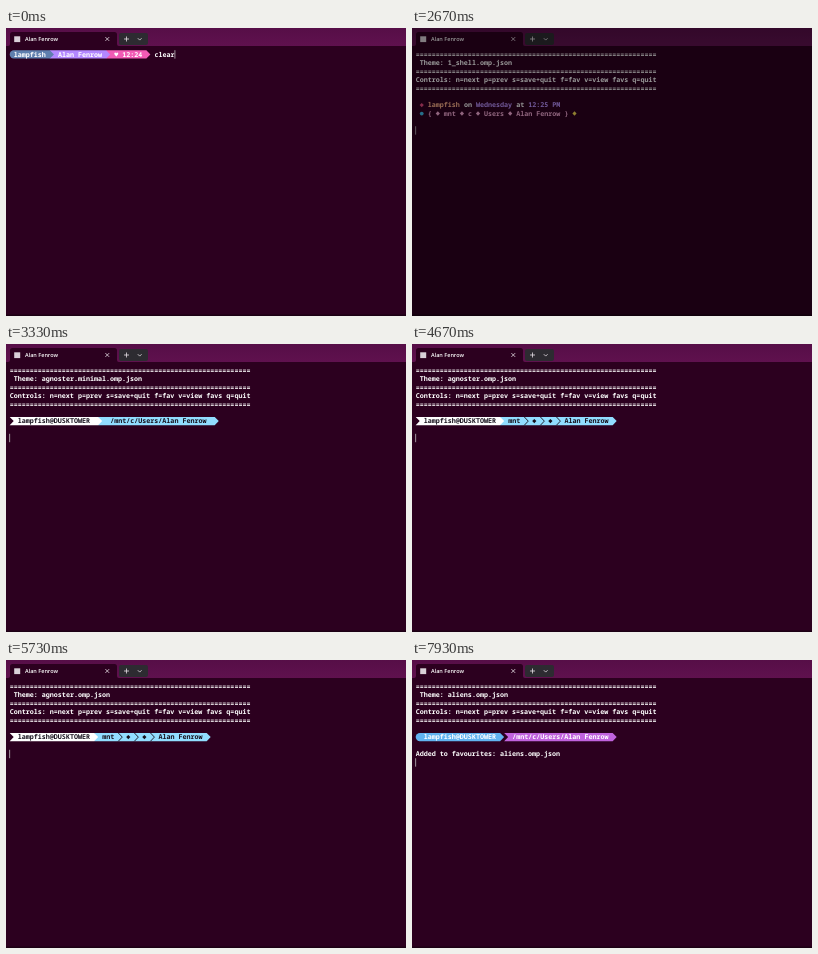
An HTML page that plays this animation: 400x288 px, repeating every 8 s.

```html
<!DOCTYPE html>
<html lang="en">
<head>
<meta charset="utf-8">
<title>Prompt theme browser</title>
<style>
html, body { margin: 0; width: 100%; height: 100%; overflow: hidden; background: #2c001f; }
svg { display: block; width: 100vw; height: 100vh; }
text { white-space: pre; text-rendering: geometricPrecision; }
.mono { font: 600 6.7px "Noto Sans Mono", "DejaVu Sans Mono", monospace; }
.tab { font: 600 5.5px "Open Sans", Inter, sans-serif; }

.scene { opacity: 0; animation: 8s step-end infinite; }
#cleared { animation-name: cleared; }
#typing { animation-name: typing; }
#head { animation-name: head; }
#shell { animation-name: shell; }
#minimal { animation-name: minimal; }
#agnoster { animation-name: agnoster; }
#aliens { animation-name: aliens; }
#waiting { animation-name: waiting; }
#added { animation-name: added; }
#cover { animation: type 8s infinite; }
#fade { opacity: 0; animation: fade 8s linear infinite; }

@keyframes cleared { 0% { opacity: 1 } .875%, 100% { opacity: 0 } }
@keyframes typing { 0% { opacity: 0 } .875% { opacity: 1 } 11.625%, 100% { opacity: 0 } }
@keyframes head { 0% { opacity: 0 } 11.625%, 100% { opacity: 1 } }
@keyframes shell { 0% { opacity: 0 } 12.5% { opacity: 1 } 36.625%, 100% { opacity: 0 } }
@keyframes minimal { 0% { opacity: 0 } 36.625% { opacity: 1 } 56.625%, 100% { opacity: 0 } }
@keyframes agnoster { 0% { opacity: 0 } 56.625% { opacity: 1 } 75%, 100% { opacity: 0 } }
@keyframes aliens { 0% { opacity: 0 } 75%, 100% { opacity: 1 } }
@keyframes waiting { 0% { opacity: 0 } 75% { opacity: 1 } 94.125%, 100% { opacity: 0 } }
@keyframes added { 0% { opacity: 0 } 94.125%, 100% { opacity: 1 } }
@keyframes type {
  0%, 1.375% { transform: none; animation-timing-function: steps(10) }
  7.5%, 100% { transform: translateX(40.2px) }
}
@keyframes fade {
  0%, 31.25% { opacity: 0 }
  36.5%, 37.375% { opacity: 1 }
  38.375%, 100% { opacity: 0 }
}
</style>
</head>
<body>
<svg viewBox="0 0 400 288" preserveAspectRatio="none">
  <defs>
    <linearGradient id="bar" x2="0" y2="1">
      <stop offset="0" stop-color="#560e47"/>
      <stop offset="1" stop-color="#5f114e"/>
    </linearGradient>
  </defs>
  <rect width="400" height="288" fill="#2c001f"/>
  <rect width="400" height="18" fill="url(#bar)"/>
  <path d="M2 18Q4 18 4 16V6.500Q4 4 6.500 4H108.500Q111 4 111 6.500V16Q111 18 113 18Z" fill="#2c001f"/>
  <rect x="8.200" y="8.300" width="6" height="5.800" fill="#d9d0d8"/>
  <text class="tab" x="19" y="13.300" fill="#fff">Alan Fenrow</text>
  <rect x="113" y="5" width="29" height="12" rx="2" fill="#2d2b31"/>
  <g fill="none" stroke="#e6dfe5" stroke-width=".8">
    <path d="M99.400 9.100l3.800 3.800m0-3.800l-3.800 3.800"/>
    <path d="M118 11h5m-2.500-2.500v5"/>
    <path d="M131.800 10.200l1.900 1.900 1.900-1.900"/>
  </g>
  <rect y="286.500" width="400" height="1.500" fill="#1c0014"/>

  <g class="scene" id="cleared"></g>
  <g class="scene" id="typing"></g>
  <g class="scene" id="head"></g>
  <g class="scene" id="shell"></g>
  <g class="scene" id="minimal"></g>
  <g class="scene" id="agnoster"></g>
  <g class="scene" id="aliens"></g>
  <g class="scene" id="waiting"></g>
  <g class="scene" id="added"></g>
  <rect id="fade" width="400" height="288"/>
</svg>
<script>
const USER = 'lampfish', HOST = 'DUSKTOWER', NAME = 'Alan Fenrow';
const HOME = '/mnt/c/Users/' + NAME;
const DARK = '#16101c', SKY = '#91ddff', PINK = '#f2a9d4';
const $ = id => document.getElementById(id);
const X = col => 3.7 + col * 4.02;
const Y = row => 26.4 + row * 8.45;

function add(parent, tag, attrs, text) {
  const el = document.createElementNS('http://www.w3.org/2000/svg', tag);
  for (const k in attrs) el.setAttribute(k, attrs[k]);
  if (text) el.textContent = text;
  parent.append(el);
  return el;
}
function put(g, row, col, text, fill = '#fff') {
  add(g, 'text', { class: 'mono', x: X(col), y: Y(row) + 2.3, fill }, text);
}
function diamond(g, row, col, fill) {
  add(g, 'path', { d: `M${X(col + .5)} ${Y(row) - 2.2}l2.1 2.2l-2.1 2.2l-2.100-2.200Z`, fill });
}
function cursor(g, row, col = 0) {
  return add(g, 'rect', { x: X(col) - .4, y: Y(row) - 4.2, width: .8, height: 8.4, fill: '#bdb8bc' });
}
// A powerline block with an arrow tip on its right
function block(g, row, from, to, fill, left = 'flat') {
  const h = 4.2, y = Y(row), a = X(from), b = X(to);
  const start = left === 'round' ? a + h : a;
  const close = {
    flat: '',
    notch: `L${X(from + 1)} ${y}`,
    round: `A${h} ${h} 0 0 1 ${start} ${y - h}`
  }[left];
  add(g, 'path', { d: `M${start} ${y - h}H${b}L${X(to + 1)} ${y}L${b} ${y + h}H${start}${close}Z`, fill });
}
function chevron(g, row, col) {
  add(g, 'path', {
    d: `M${X(col)} ${Y(row) - 4.2}L${X(col + 1)} ${Y(row)}L${X(col)} ${Y(row) + 4.2}`,
    fill: 'none', stroke: DARK, 'stroke-width': .9
  });
}
function theme(g, name) {
  put(g, 1, 1, `Theme: ${name}.omp.json`);
}

function heartPrompt(g, time) {
  block(g, 0, 24, 34, '#f15bb5');
  block(g, 0, 10, 24, '#b388ff');
  block(g, 0, 0, 10, '#5f7fae', 'round');
  put(g, 0, 1, USER);
  put(g, 0, 12, NAME);
  put(g, 0, 26, '♥');
  put(g, 0, 28, time);
}
heartPrompt($('cleared'), '12:24');
put($('cleared'), 0, 36, 'clear');
cursor($('cleared'), 0, 41.1);

heartPrompt($('typing'), '12:25');
put($('typing'), 0, 36, './theme.sh');
const cover = add($('typing'), 'g', { id: 'cover' });
add(cover, 'rect', { x: X(36), y: Y(0) - 4.5, width: 46, height: 9, fill: '#2c001f' });
cursor(cover, 0, 36.1);

for (const row of [0, 2, 4]) put($('head'), row, 0, '='.repeat(60));
put($('head'), 3, 0, 'Controls: n=next p=prev s=save+quit f=fav v=view favs q=quit');

const shell = $('shell');
theme(shell, '1_shell');
diamond(shell, 6, 1, '#e0487c');
put(shell, 6, 3, USER, '#ffb48c');
put(shell, 6, 12, 'on');
put(shell, 6, 15, 'Wednesday', '#bc93ff');
put(shell, 6, 25, 'at');
put(shell, 6, 28, '12:25 PM', '#bc93ff');
add(shell, 'circle', { cx: X(1.5), cy: Y(7), r: 1.9, fill: '#3fb9e6' });
[[3, '{'], [7, 'mnt'], [13, 'c'], [17, 'Users'], [25, NAME], [37, '}']]
  .forEach(([col, text]) => put(shell, 7, col, text, PINK));
[5, 11, 15, 23].forEach(col => diamond(shell, 7, col, PINK));
diamond(shell, 7, 39, '#f0d650');
cursor(shell, 9);

const minimal = $('minimal');
theme(minimal, 'agnoster.minimal');
block(minimal, 6, 22, 51, SKY);
block(minimal, 6, 0, 22, '#fff', 'notch');
put(minimal, 6, 2, `${USER}@${HOST}`, DARK);
put(minimal, 6, 25, HOME, DARK);
cursor(minimal, 8);

const agnoster = $('agnoster');
theme(agnoster, 'agnoster');
block(agnoster, 6, 21, 49, SKY);
block(agnoster, 6, 0, 21, '#fff', 'notch');
put(agnoster, 6, 2, `${USER}@${HOST}`, DARK);
put(agnoster, 6, 23, 'mnt', DARK);
[27, 31, 35].forEach(col => chevron(agnoster, 6, col));
[29, 33].forEach(col => diamond(agnoster, 6, col, DARK));
put(agnoster, 6, 37, NAME, DARK);
cursor(agnoster, 8);

const aliens = $('aliens');
theme(aliens, 'aliens');
block(aliens, 6, 0, 21, '#61b3f0', 'round');
block(aliens, 6, 22, 49, '#c063dd', 'notch');
put(aliens, 6, 2, `${USER}@${HOST}`);
put(aliens, 6, 24, HOME);
cursor($('waiting'), 8);

put($('added'), 8, 0, 'Added to favourites: aliens.omp.json');
cursor($('added'), 9);
</script>
</body>
</html>
```
